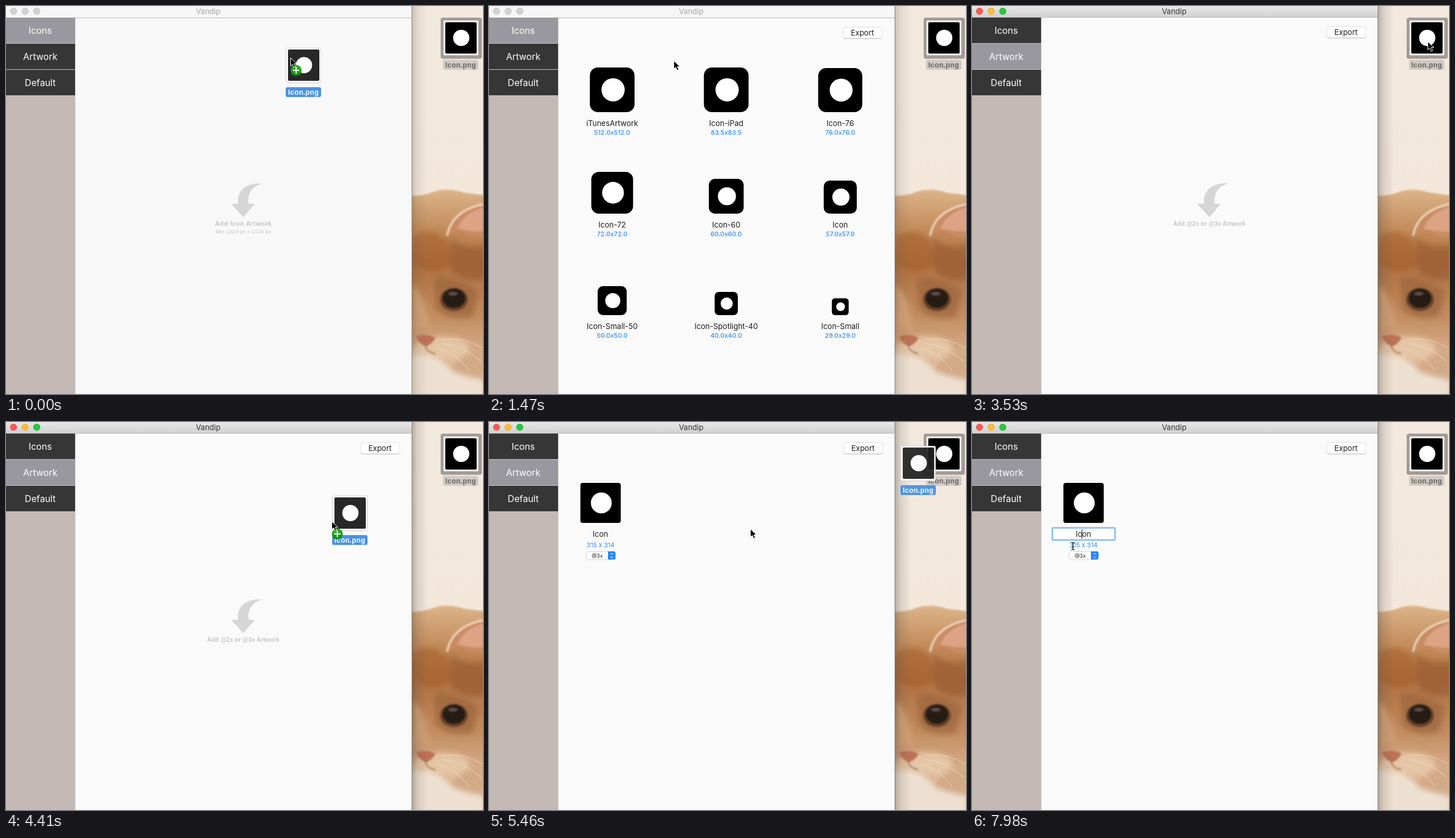
Write an HTML page that moves like this. It is 822 px wide and 669 px high and loops after 8 s.

```html
<!DOCTYPE html>
<html>
<head>
<meta charset="utf-8">
<style>
  html, body { margin: 0; width: 100%; height: 100%; overflow: hidden; }
  svg { display: block; width: 822px; height: 669px; }
  text { font: 13px Inter, sans-serif; text-anchor: middle; fill: #1c1c1c; }
  .tab { font-size: 15.7px; fill: #fff; }
  .size { font-size: 11px; font-weight: 500; fill: #2d8ef7; }
  .file { font: bold 12px "Liberation Sans", sans-serif; letter-spacing: .4px; }
  .hint { font: bold 11px "Liberation Sans", sans-serif; letter-spacing: .42px; fill: #c4c4c4; }
  .fine { font-size: 9px; font-weight: normal; letter-spacing: .25px; }
  .fine2x { font-size: 10px; letter-spacing: .23px; }
</style>
</head>
<body>
<svg viewBox="0 0 822 669">
  <defs>
    <linearGradient id="wall" x2="0" y2="1">
      <stop stop-color="#f2e9df"/><stop offset=".5" stop-color="#f3e7da"/><stop offset="1" stop-color="#ecdccb"/>
    </linearGradient>
    <linearGradient id="fur" x2="0" y2="1">
      <stop stop-color="#dcb48a"/><stop offset=".17" stop-color="#c58f5e"/><stop offset=".35" stop-color="#ae6f40"/>
      <stop offset=".6" stop-color="#c38c60"/><stop offset=".8" stop-color="#d9b291"/><stop offset="1" stop-color="#e7d0b9"/>
    </linearGradient>
    <linearGradient id="bar" x2="0" y2="1"><stop stop-color="#e8e8e8"/><stop offset="1" stop-color="#d0d0d0"/></linearGradient>
    <linearGradient id="shade"><stop stop-color="#4a4640"/><stop offset=".35" stop-color="#4a4640" stop-opacity=".4"/><stop offset="1" stop-color="#4a4640" stop-opacity="0"/></linearGradient>
    <linearGradient id="green" x2="0" y2="1"><stop stop-color="#35b52a"/><stop offset="1" stop-color="#0d8a0c"/></linearGradient>
    <filter id="soft" x="-30%" y="-30%" width="160%" height="160%"><feGaussianBlur stdDeviation="5"/></filter>
    <filter id="edge"><feGaussianBlur stdDeviation="1.5"/></filter>
  </defs>

  <!-- Wallpaper -->
  <rect x="690" width="132" height="669" fill="url(#wall)"/>
  <path d="M690 326Q712 330 735 321T790 322L830 327V680H690Z" fill="url(#fur)" filter="url(#edge)"/>
  <g filter="url(#soft)">
    <path d="M700 400Q730 375 760 405L772 440Q740 470 715 450L700 440Z" fill="#a5622f" opacity=".6"/>
    <path d="M765 400Q790 420 825 412V470Q790 480 768 455Z" fill="#99592f" opacity=".65"/>
    <path d="M738 470Q765 462 815 490L805 535Q760 545 740 520Z" fill="#9a653d" opacity=".7"/>
    <path d="M700 480Q725 500 728 555L700 560Z" fill="#d2a074"/>
    <path d="M696 590Q750 555 795 580Q810 620 750 608Q715 604 696 612Z" fill="#e4c5a6"/>
    <path d="M690 602Q745 598 765 625L822 640V680H690Z" fill="#eee0d0"/>
    <path d="M765 628Q790 590 825 595V645Q790 640 765 628Z" fill="#d3aa87"/>
  </g>
  <g filter="url(#edge)">
    <path d="M760 396Q768 352 826 340V398Q800 402 785 385Q772 390 760 396Z" fill="#c98b60"/>
    <path d="M778 384Q788 356 826 346V388Q805 390 778 384Z" fill="#dca384"/>
    <path d="M760 396Q768 352 826 341" fill="none" stroke="#f3dcc4" stroke-width="3"/>
    <ellipse cx="772" cy="506" rx="24" ry="20" fill="#6b452b"/>
    <ellipse cx="772" cy="504" rx="20" ry="17" fill="#251a14"/>
    <ellipse cx="770" cy="496" rx="8" ry="3" fill="#5d5048"/>
    <path d="M706 570Q725 563 740 572Q734 584 723 587Q712 582 706 570Z" fill="#bd7257"/>
    <path d="M723 586Q724 596 740 600" fill="none" stroke="#a77555" stroke-width="2"/>
  </g>
  <path d="M752 575Q790 570 822 590M752 582Q785 585 818 612M745 590Q775 598 798 628" fill="none" stroke="#f4e2cf" opacity=".7"/>
  <rect id="shadow" x="699" width="28" height="669" fill="url(#shade)"/>

  <!-- Desktop file -->
  <rect x="749" y="20" width="71" height="71" rx="4" fill="#a49c95"/>
  <rect x="754" y="25" width="60" height="60" rx="2" fill="#fff"/>
  <rect x="757" y="28" width="54" height="54" rx="2"/>
  <circle cx="784.5" cy="55" r="14" fill="#fff"/>
  <rect x="753" y="93" width="61" height="17" rx="3" fill="#cfcac5"/>
  <text class="file" x="783.7" y="106" style="fill:#65625f">Icon.png</text>

  <!-- Window -->
  <rect id="body" width="699" height="669"/>
  <rect y="20" width="119.5" height="649" fill="#c3bab5"/>
  <rect id="titlebar" width="699" height="20"/>
  <path id="rule" d="M0 20.5H699" stroke="#b7b7b7"/>
  <path d="M699.5 0V669" stroke="#85817e"/>
  <g id="lights"></g>
  <text id="title" x="348.5" y="14">Vandip</text>
  <g id="tabs"></g>
  <g id="export">
    <rect x="610.5" y="37" width="67" height="20" rx="4" fill="#d0d0d0"/>
    <rect x="610.5" y="36.5" width="67" height="19" rx="4" fill="#fff" stroke="#dedede"/>
    <text x="643.5" y="51">Export</text>
  </g>
  <g id="drop">
    <path d="M442 306C414 303 397 319 400 341H388L409 364L429 341H418C416 324 424 310 442 306Z" fill="#d6d6d6"/>
    <g id="hintIcons">
      <text class="hint" x="409" y="378.5">Add Icon Artwork</text>
      <text class="hint fine" x="409" y="392">Min 1024 px x 1024 px</text>
    </g>
    <text id="hintArt" class="hint fine2x" x="409" y="378.5">Add @2x or @3x Artwork</text>
  </g>
  <g id="icons"></g>
  <g id="art">
    <rect x="157.5" y="105" width="69.5" height="69" rx="4"/>
    <circle cx="193.5" cy="139.5" r="18" fill="#fff"/>
    <rect id="field" x="138.5" y="182.5" width="108" height="21" rx="1.5" fill="#fff" stroke="#94c3f6" stroke-width="3"/>
    <text x="192" y="198">Icon</text>
    <path id="caret" d="M189.5 185V201" stroke="#000"/>
    <text class="size" x="192.3" y="216" style="font-weight:400">315 x 314</text>
    <rect x="167.5" y="223.5" width="50" height="14" rx="3" fill="#fff" stroke="#d5d5d5"/>
    <path d="M205 223H215Q218 223 218 226V234Q218 237 215 237H205Z" fill="#2686f8"/>
    <path d="M209.3 228.5L211.5 226L213.7 228.5M209.3 232L211.5 234.5L213.7 232" fill="none" stroke="#fff"/>
    <text x="186.5" y="234" style="font-size:9px">@3x</text>
  </g>

  <!-- Dragged file, placed relative to the desktop file -->
  <g id="drag">
    <rect x="753.5" y="25.5" width="60" height="60" rx="2" fill="#fff" stroke="#d2d0ce"/>
    <rect x="757" y="28" width="54" height="54" rx="2" fill="#222"/>
    <circle cx="784.5" cy="55" r="14" fill="#fff"/>
    <rect x="753" y="93" width="61" height="17" rx="3" fill="#4690e2"/>
    <text class="file" x="783.7" y="106" style="fill:#fff">Icon.png</text>
  </g>
  <g id="cursor">
    <g id="badge">
      <circle cx="10" cy="22" r="9.5" fill="url(#green)"/>
      <path d="M4.5 22H15.5M10 16.5V27.5" stroke="#fff" stroke-width="2"/>
    </g>
    <path id="arrow" d="M.5 .5V14.5L3.8 11.5L6.2 17L8.8 15.9L6.4 10.5H11Z" stroke="#fff"/>
    <path id="beam" d="M-3 -6.5Q0 -6.5 0 -4V4Q0 6.5 -3 6.5M3 -6.5Q0 -6.5 0 -4M0 4Q0 6.5 3 6.5M-2 1.5H2" fill="none" stroke="#111" stroke-width="1.2"/>
  </g>
</svg>
<script>
const $ = id => document.getElementById(id);
const show = (id, on) => $(id).style.display = on ? '' : 'none';
const move = (id, [x, y]) => $(id).setAttribute('transform', `translate(${x} ${y})`);

$('lights').innerHTML = [13, 33, 53].map(x => `<circle cx="${x}" cy="9" r="5.7"/>`).join('');
$('tabs').innerHTML = ['Icons', 'Artwork', 'Default'].map((name, i) =>
  `<rect y="${20 + 45 * i}" width="119" height="44"/>
   <path d="M0 ${64.5 + 45 * i}H119" stroke="#c9c6c3"/>
   <text class="tab" x="59" y="${47.5 + 45 * i}">${name}</text>`).join('');

const iconSet = [
  ['iTunesArtwork', 512, 77], ['Icon-iPad', 83.5, 77], ['Icon-76', 76, 76],
  ['Icon-72', 72, 72], ['Icon-60', 60, 60], ['Icon', 57, 57],
  ['Icon-Small-50', 50, 50], ['Icon-Spotlight-40', 40, 40], ['Icon-Small', 29, 29]
];
$('icons').innerHTML = iconSet.map(([name, size, side], i) => {
  const x = 212.3 + 196.5 * (i % 3), y = 183 + 175 * (i / 3 | 0), px = size.toFixed(1);
  return `<rect x="${x - side / 2}" y="${y - side}" width="${side}" height="${side}" rx="${side * .18}"/>
    <circle cx="${x + side * .02}" cy="${y - side / 2}" r="${side * .26}" fill="#fff"/>
    <text x="${x}" y="${y + 24}">${name}</text>
    <text class="size" x="${x}" y="${y + 39}">${px}x${px}</text>`;
}).join('');

// Paths are [step, x, y] points
const pointer = [
  [0, 490, 89], [1, 400, 100], [2, 375, 107], [8, 375, 107], [9, 352, 101], [10, 318, 94],
  [12, 175, 90], [13, 112, 88], [14, 87, 87], [17, 87, 87], [20, 360, 62], [22, 735, 55],
  [23, 782, 61], [24, 785, 61], [27, 785, 61], [28, 762, 72], [30, 561, 171], [31, 480, 182],
  [33, 450, 184], [37, 450, 184], [41, 265, 187], [43, 195, 187], [44, 193, 187],
  [45, 190, 193], [46, 190, 193], [48, 193, 214], [50, 196, 228], [51, 196, 228], [52, 191, 222], [54, 174, 214]
];
const dragPath = [
  [0, -271, 47], [1, -372, 48], [2, -410, 48], [3, -410, 48], [4, -220, 26], [5, -55, 6], [6, -11, 1],
  [28, -2, 6], [29, -70, 40], [30, -191, 102], [31, -275, 118], [32, -325, 124], [33, -336, 125],
  [35, -336, 125], [36, -170, 62], [37, -44, 16], [38, -9, 3]
];
function along(path, step) {
  const i = path.findIndex(p => p[0] >= step);
  if (i < 0) return path.at(-1).slice(1);
  if (i === 0) return path[0].slice(1);
  const [a, b] = [path[i - 1], path[i]], k = (step - a[0]) / (b[0] - a[0]);
  return [1, 2].map(n => a[n] + (b[n] - a[n]) * k);
}

const LOOP = 8000, STEP = 147.4;
function draw(now) {
  const step = Math.floor((now % LOOP + 14) / STEP);
  const active = step >= 16, artwork = step >= 17, iconsDone = step >= 4, artDone = step >= 36;
  const carrying = step < 4 || step >= 28 && step < 36;
  const at = along(pointer, step), beam = step >= 45 && at[1] < 219;

  $('body').setAttribute('fill', iconsDone ? '#fafafa' : '#f8f8f8');
  $('titlebar').setAttribute('fill', active ? 'url(#bar)' : '#f6f6f6');
  $('title').style.fill = active ? '#333' : '#a5a5a5';
  $('shadow').setAttribute('opacity', active ? .38 : .25);
  move('rule', [0, artwork ? -1 : 0]);
  [...$('lights').children].forEach((c, i) => {
    c.setAttribute('fill', active ? ['#fc5b57', '#fdbc34', '#27c840'][i] : '#d2d2d2');
    c.setAttribute('stroke', active ? ['#e2463f', '#e0a029', '#1caa2d'][i] : '#bcbcbc');
    c.setAttribute('stroke-width', .7);
  });
  $('tabs').querySelectorAll('rect').forEach((r, i) =>
    r.setAttribute('fill', i === +artwork ? '#98989e' : '#363636'));

  show('export', iconsDone);
  move('export', artwork ? [1, -1] : [0, 0]);
  show('icons', iconsDone && !artwork);
  show('drop', !iconsDone || artwork && !artDone);
  show('hintIcons', !artwork);
  show('hintArt', artwork);
  show('art', artDone);
  show('field', step >= 44);
  show('caret', step >= 45 && (step < 48 || step > 51));

  show('drag', step < 7 || step >= 28 && step < 39);
  $('drag').setAttribute('opacity', carrying ? .97 : .93);
  move('drag', along(dragPath, step));
  move('cursor', at);
  show('badge', carrying && step !== 28);
  show('arrow', !beam);
  show('beam', beam);
}
const start = performance.now();
(function tick() {
  draw(performance.now() - start);
  requestAnimationFrame(tick);
})();
</script>
</body>
</html>
```
